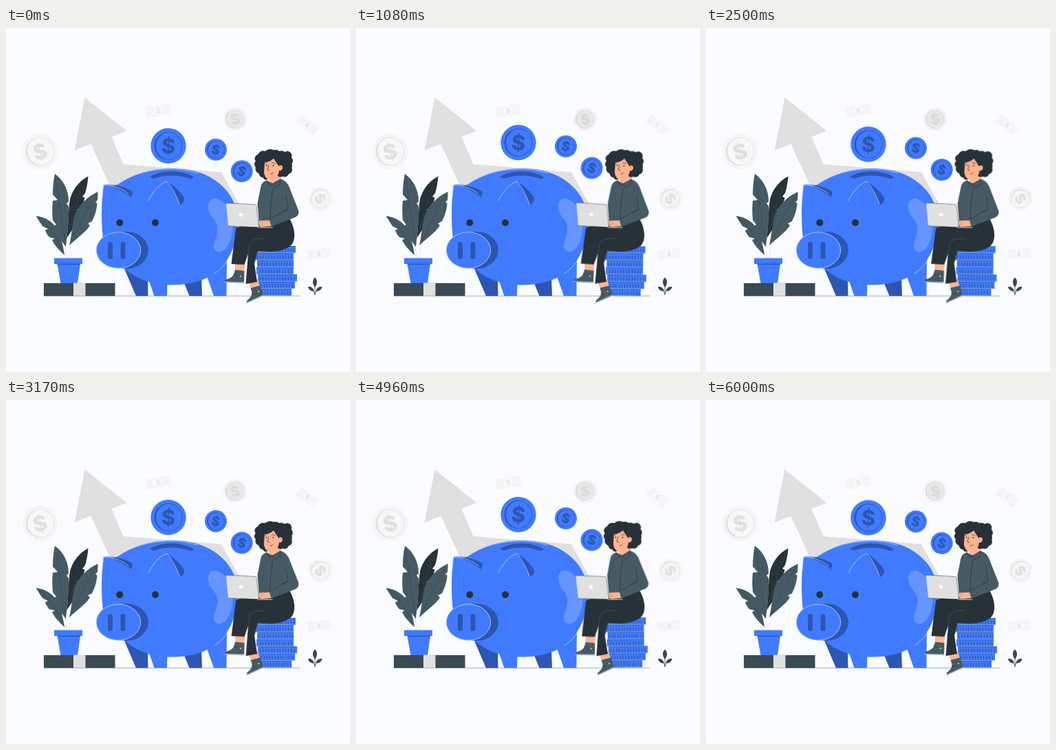
Animation of 500x500 px, one loop 6040 ms. Source, as an HTML page:

```html
<!DOCTYPE html>
<html lang="en">
<head>
<meta charset="utf-8">
<title>Savings</title>
<style>
  html, body { margin: 0; width: 100%; height: 100%; overflow: hidden; background: #fafcff; }
  svg { display: block; width: 100vw; height: 100vh; }
  text { font: 800 10px Inter, "Open Sans", sans-serif; text-anchor: middle; }
  #coins { animation: bob 3.02s linear infinite; }
  #saver { animation: sway 6.04s linear infinite; transform-origin: 371px 288px; }
  @keyframes bob { 50% { transform: translateY(-6.67px); } }
  @keyframes sway {
    0%, 100% { transform: rotate(0deg); }
    25% { transform: rotate(1deg); }
    75% { transform: rotate(-1deg); }
  }
  .blue { fill: #407bff; }
  .navy { fill: #2d56b3; }
  .ink { fill: #263238; }
  .slate { fill: #455a64; }
  .skin { fill: #ffb391; }
  .line { fill: none; stroke: #263238; stroke-width: .7; stroke-linecap: round; stroke-linejoin: round; }
  .shine { fill: none; stroke: #fff; stroke-width: .7; stroke-linecap: round; opacity: .75; }
</style>
</head>
<body>
<svg viewBox="0 0 500 500">
  <path fill="#e0e0e0" d="M114.5 101 175.5 149.5 153.5 158 170.5 198 313 209.5 340 258 325 280 240 230 165 245 151 229 123.5 168.5 99.5 178Z"/>
  <g id="backdrop"></g>
  <path class="line" d="M55 389.5H427" stroke-width=".5" opacity=".5"/>

  <g id="plant">
    <path d="M84 308 89 335M97 306 91 335M84 325 88 335" fill="none" stroke="#eceef0" stroke-width="1.5"/>
    <path class="ink" d="M119.5 215.5C107 222 97 234 93 249C90 268 91 287 88 306C96 294 103 284 106 268L103 264 108 261C111 257 113 253 114.500 247L111 245 115 240C117 233 119 224 119.500 215.500Z"/>
    <path class="slate" d="M71 212C84 221 91 236 91 252L88 255 91 259C92 277 89 299 87 318C78 305 69 298 67.500 288L73 286 68 279C67 269 67 260 68 251L75 250 68 242C68 231 69 221 71 212Z"/>
    <path class="slate" d="M133.500 238C118 245 105 258 99.500 273C96 286 96 299 92 316C103 305 115 298 122 287L119 284 125 281C130 271 132 263 132.500 255L130 253 133 250C133.500 246 133.500 242 133.500 238Z"/>
    <path class="slate" d="M43.500 273C57 275 68 281 74 292C80 304 83 316 85 330C76 322 70 315 67 308L71 306 63 304C60 301 58 297 57 294L61 292 53 288C50 283 47 279 43.500 273Z"/>
    <path d="M72 220C77 245 80 276 86 310M118 219C106 244 98 270 91 300M131 242C117 265 106 287 95 312M46 275C62 286 74 304 84 328" fill="none" stroke="#37474f" stroke-width=".6"/>
    <path class="blue" d="M70 334.5H111V343H108L104 371H79.500L74.500 343H70Z"/>
    <path class="navy" d="M74.500 342.500H108L107.800 344H75Z"/>
    <path fill="#3b4d56" d="M55 371H158.500V389.500H55Z"/>
    <path class="line" d="M55 371.200H158.500M55 375H157M55 380H158M56 384H158M55 387H158" opacity=".55"/>
    <path fill="#e0e0e0" d="M98 370.500H115.500V389.500H98Z"/>
  </g>

  <g id="sprig" fill="#37474f">
    <path d="M449 362.500C453 366 453 372 449 377C445 372 445 366 449 362.500Z"/>
    <path d="M439 376C444 375.500 447 378 447.500 382.500C443 383 440 380.500 439 376Z"/>
    <path d="M459.500 376C454.500 375.500 451 378 450.500 382.500C455 383 458.500 380.500 459.500 376Z"/>
    <path class="line" d="M449 376V388M447 382 449 387 451 382" stroke-width=".5"/>
  </g>

  <g id="pig">
    <path class="navy" d="M172 350 189 389.500H206.500L206 360ZM257 366 266.500 389.500H285L284 360Z"/>
    <path class="blue" d="M206 362 215.500 389.500H234L235 365ZM290 355 302 389.500H320.500L321 335Z"/>
    <path class="blue" d="M141.500 228C147 226.500 153 228 160 228.500C183 212 211 204 240 204C270 204 296 212 314 229.500C329 243 337 262 337 282C336.500 312 326 336 309 352C289 369 263 374 236 373.500C211 372.500 189 365 173 350L142 310C138 290 138.500 252 141.500 228Z"/>
    <path fill="#6695ff" d="M294 262C293 252 298 247 305 248C321 252 330 270 329.500 290C329 308 321 325 310 325.500C302 325 300 318 304 308C308 298 309 288 304 280C299 274 295 270 294 262Z"/>
    <path class="navy" d="M158 228.500C169 230 179 234 184 238L182 246C174 240 167 236 156 231Z"/>
    <path class="navy" d="M234 223C245 230 255 239 259.500 248C259 253 256 256 253 257.500C248 245 241 233 234 223Z"/>
    <path class="navy" d="M209.500 216.500C229 206 256 207 273 217.500L268 219.500C252 213 232 213 215 219Z"/>
    <path d="M209.500 216.500C229 206 256 207 273 217.500" fill="none" stroke="#263238" stroke-width=".5"/>
    <path class="shine" d="M163 227C185 211 213 205 240 205C254 205 266 207 278 211M207 251C213 239 222 227 234 223C241 231 247 242 252 256M140 247C140.500 240 141 233 142 228.500C150 227.500 163 230 178 241M303 357C313 350 322 340 328 329M235 374V388"/>
    <ellipse class="navy" cx="175" cy="323" rx="32" ry="27"/>
    <ellipse class="blue" cx="163.500" cy="323" rx="32.500" ry="26.500"/>
    <ellipse class="shine" cx="163.500" cy="323" rx="32.200" ry="26.200"/>
    <rect class="navy" x="148" y="311" width="7" height="25" rx="3.500"/>
    <rect class="navy" x="166.500" y="311" width="7" height="25" rx="3.500"/>
    <circle class="ink" cx="165.300" cy="283" r="5"/>
    <circle class="ink" cx="217" cy="283" r="5"/>
  </g>

  <g id="coins"></g>

  <g id="saver">
    <g id="stack"></g>
    <g id="legs">
      <path class="skin" d="M333 341 347.500 344 346 354 333 352ZM352 367 366 365 369 376 356 379Z"/>
      <path class="slate" d="M333 351.500 346.500 353 346 369.500 318 369 317.500 366.500C323 365 330 362 331 358ZM355.500 378 369 374.500 374.500 387.500 351 399 349.500 397C354 393 358 389 357.500 384Z"/>
      <path d="M317 369 346 370.200M349.500 399.600 374.500 388.300" fill="none" stroke="#9da7ac" stroke-width="1.500"/>
      <path class="line" d="M331 358 336 360M357 386 361 387"/>
      <circle cx="341" cy="361" r="1" fill="#e0e0e0"/>
      <circle cx="367" cy="383" r="1" fill="#e0e0e0"/>
      <path class="ink" d="M412 277C420 290 422 307 415 315C410 321 397 325 384 325L366 324 361 342 365 369 348.500 372 352 328 346.500 344 327.500 343 334 292C336 289 340 288 346 288L368 284Z"/>
      <path d="M352 328 354 315C356 307 364 306 377 306M361 342 366 324" fill="none" stroke="#536067" stroke-width=".6"/>
    </g>
    <g id="torso">
      <path class="skin" d="M385 211 399 205 400 222 390 229 382 222Z"/>
      <path class="slate" d="M379 221.500 388 226 399 219.500C408 222 411 228 414 237L425 265C426.500 270 424 274 418 276L386 288.500 368 285 365.500 255 370 232C371 226 374 223 379 221.500Z"/>
      <path class="line" d="M379 221.500 384 229 388 226 399 219.500 398 228 391 232 388 226M388 232C385 248 384 263 384 277M407 244 410 263 383 278M409 264 402 268M387 242V243M385 256V257M381 279 385 288"/>
      <path class="skin" d="M383 279.500 385.500 288 371 289 365.500 286.500 369 280Z"/>
      <path d="M368 283H374M367 285.500H373" stroke="#c97a60" stroke-width=".5"/>
    </g>
    <g id="laptop">
      <path fill="#c4c7c9" d="M364 288.500 388 289.500 387 291 366 290.500Z"/>
      <path fill="#e0e0e0" d="M321.500 254.500 361.500 256.500Q363.500 256.500 364 258.500L367.500 289.500 325 288Q323.500 288 323 286.500L320 256.500Q319.800 254.500 321.500 254.500Z"/>
      <path class="line" d="M321 254.500 362 256.500Q363.500 256.800 364 258.500L367.500 289.500M324 288 388 290.500" stroke-width=".5" opacity=".7"/>
      <circle cx="341.500" cy="271.500" r="2.800" fill="#fff"/>
    </g>
    <g id="head">
      <g id="hair" class="ink"></g>
      <path class="skin" d="M376 195C381 195 386 193 389 189.500C391 193 394 197 396.500 201C399 198 402.500 200 402 203.500C401 207 398.500 208 397 207C396.500 214 392 220 386 220.500C379 221 375.500 216 375 209Z"/>
      <path class="line" d="M382 199 380 206 383 207M384 212Q387 212.500 388.500 210M376 196.500 379 196M386.500 196Q389 194.800 391.500 197"/>
      <circle class="ink" cx="378.500" cy="199.500" r=".9"/>
      <circle class="ink" cx="388.500" cy="200" r=".9"/>
      <path d="M398 203 400 202" stroke="#c97a60" stroke-width=".6"/>
    </g>
  </g>
</svg>
<script>
  const fill = (id, html) => { document.getElementById(id).innerHTML = html; };

  const dollar = (size, color) =>
    `<text y="${size * .36}" style="font-size:${size}px" fill="${color}">$</text>`;

  const coin = (x, y, r, turn, face, inner, mark) => `
    <g transform="translate(${x} ${y}) rotate(${turn})">
      <circle r="${r}" fill="${face}"/>
      <circle r="${r * .78}" fill="${inner}" stroke="${mark}" stroke-width="${r * .02 + .3}"/>
      <path d="M0 ${r * -.78}A${r * .78} ${r * .78} 0 0 0 0 ${r * .78}A${r * .785} ${r * .785} 0 0 1 0 ${r * -.78}Z" fill="${mark}"/>
      ${dollar(r * 1.18, mark)}
    </g>`;

  const note = (x, y, w, h, turn) => `
    <g transform="translate(${x} ${y}) rotate(${turn})">
      <rect x="${-w / 2}" y="${-h / 2}" width="${w}" height="${h}" fill="#f5f5f5"/>
      <circle r="${h * .42}" fill="#fafafa"/>
      ${dollar(h * .66, "#e3e3e3")}
    </g>`;

  const pale = (x, y, r, turn, inner, mark = "#e0e0e0") => coin(x, y, r, turn, "#f5f5f5", inner, mark);
  const bright = (x, y, r, turn) => coin(x, y, r, turn, "#407bff", "#407bff", "#2d56b3");

  fill("backdrop",
    pale(49.5, 179.5, 26, -14, "#f7f7f7") +
    pale(333, 132.5, 17.5, -12, "#e8e8e8", "#dadada") +
    pale(457, 248, 17.5, 55, "#f5f5f5") +
    note(221.5, 120, 36, 15, -9) + note(438, 141, 32, 14, 38) + note(455, 328, 33, 14, -6));

  fill("coins", bright(236, 171.3, 25.7, 3) + bright(305, 176.8, 16, 14) + bright(342.7, 208.3, 16, 18));

  // left edge, right edge of each coin, top to bottom
  const rows = [[363, 421], [361, 418], [365, 418], [364, 418], [366, 423], [365, 420], [368, 415]];
  fill("stack", rows.map(([a, b], i) => {
    const y = 317 + i * 10.35;
    return `<rect class="blue" x="${a}" y="${y}" width="${b - a}" height="10.2"/>
      <path d="M${a} ${y + .3}H${b}" stroke="#263238" stroke-width=".6"/>
      <path d="M${a} ${y + 9.9}H${b}" stroke="#c5d7ff" stroke-width=".6"/>
      <path d="M${a + 2} ${y + 6}H${b - 1}" stroke="#263f7d" stroke-width="5.6" stroke-dasharray=".7 3 .7 3.8" stroke-dashoffset="${i * 1.7}"/>`;
  }).join(""));

  const curls = [[384, 186, 10], [374, 187, 8.5], [368, 190, 6.5], [366.5, 198, 5.5], [369, 205, 6.5],
    [374, 211, 6.5], [378, 216, 4.5], [392, 185, 8], [400, 187, 8.5], [409, 185.5, 6.5],
    [411, 193, 6], [408, 200, 8], [410, 206, 6], [405, 210, 6.5], [399, 211, 5.5]];
  fill("hair", `<ellipse cx="389" cy="195" rx="23" ry="15"/>` +
    curls.map(([x, y, r]) => `<circle cx="${x}" cy="${y}" r="${r}"/>`).join(""));
</script>
</body>
</html>
```
